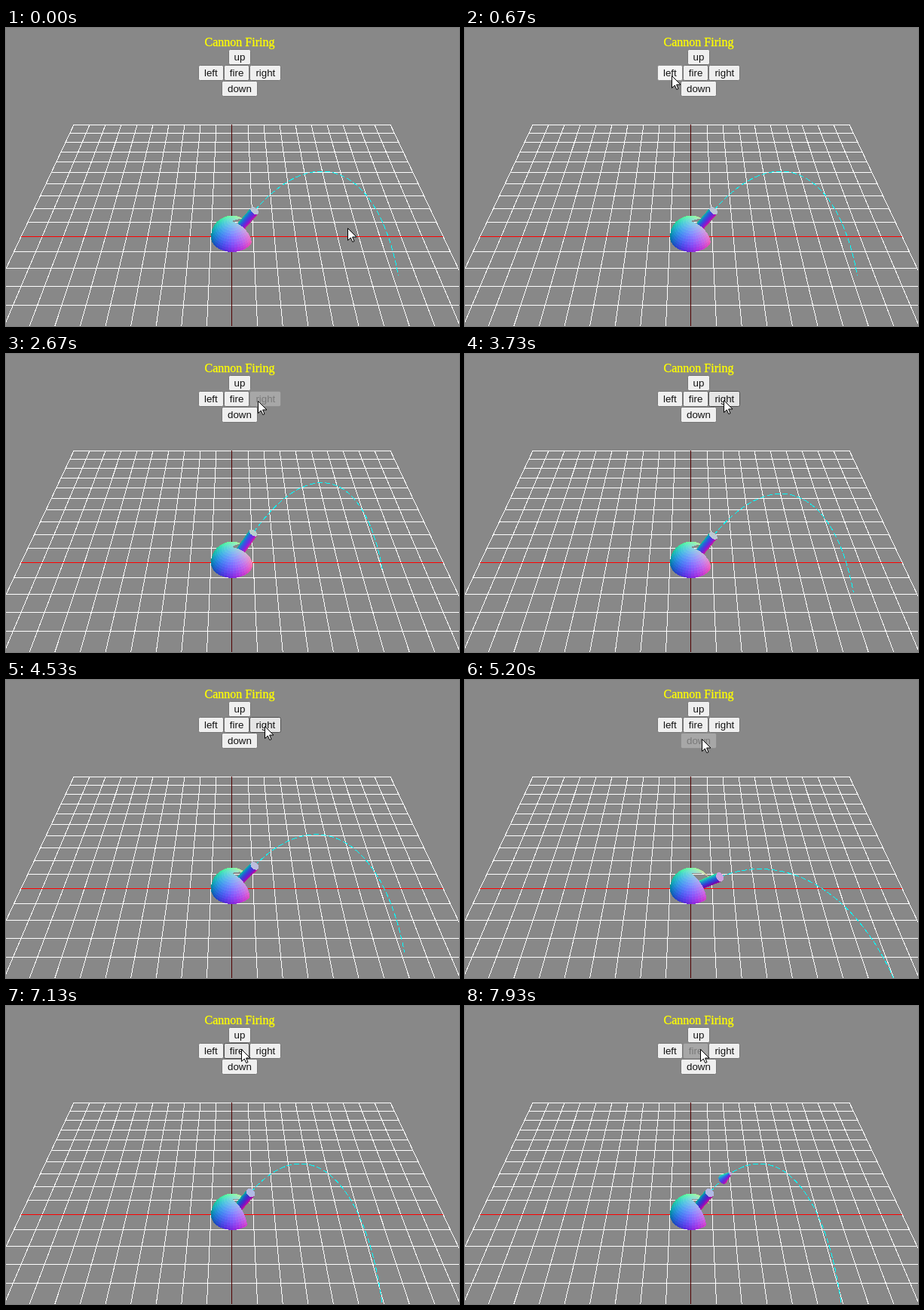
These frames come from a looping animation (601 px wide and 395 px high, 8 s). An HTML page:

```html
<!DOCTYPE html>
<html lang="en">
<head>
<meta charset="utf-8">
<title>Cannon Firing</title>
<style>
  html, body { margin: 0; width: 100%; height: 100%; overflow: hidden; background: #888; }
  svg { display: block; width: 601px; height: 395px; }
  .crisp { shape-rendering: crispEdges; }
  .title { font: 16px "Liberation Serif", "Times New Roman", serif; fill: #ff0; stroke: #ff0; stroke-width: .3; text-anchor: middle; }
  .btn text { font: 13.333px "Liberation Sans", Arial, sans-serif; fill: #111; text-anchor: middle; }
  .btn rect { fill: #efefef; stroke: #767676; }
  .btn.hover rect { fill: #e5e5e5; stroke: #4f4f4f; }
  .btn.active rect { fill: #f5f5f5; stroke: #8d8d8d; }
  .btn.off rect { fill: rgba(239,239,239,.3); stroke: rgba(118,118,118,.3); }
  .btn.off text { fill: rgba(16,16,16,.3); }
</style>
</head>
<body>
<svg viewBox="0 0 601 395">
  <rect width="601" height="395" fill="#888"/>
  <g class="crisp" fill="none">
    <path id="grid" stroke="#fff"/>
    <path id="axisX" stroke="#f00"/>
    <path id="axisZ" stroke="#500000"/>
    <path id="arc" stroke="#0ff" stroke-dasharray="7 3"/>
  </g>
  <g id="cannon" class="crisp"></g>
  <g id="shell" class="crisp"></g>
  <text class="title" x="310" y="24">Cannon Firing</text>
  <g id="buttons"></g>
  <path id="cursor" d="M-.5 .5V16.5L3.3 13L5.8 18.5L8 17.5L5.6 12H11Z" fill="#fff" stroke="#000"/>
</svg>
<script>
const LOOP = 8000, RAD = Math.PI / 180;
const SPEED = 8, GRAVITY = 9.8, LENGTH = 2.1;
const CAM = [0, 15, 15];
const $ = id => document.getElementById(id);

// ---- vectors and projection: camera looks at the origin from 45 degrees
const add = (a, b, k = 1) => a.map((v, i) => v + b[i] * k);
const dot = (a, b) => a[0] * b[0] + a[1] * b[1] + a[2] * b[2];
const cross = (a, b) => [a[1] * b[2] - a[2] * b[1], a[2] * b[0] - a[0] * b[2], a[0] * b[1] - a[1] * b[0]];
const unit = a => a.map(v => v / Math.hypot(...a));

function project([x, y, z]) {
  const depth = 30 - y - z;
  return (300.02 + 840 * x / depth).toFixed(2) + ' ' + (276.5 - 593 * (y - z) / depth).toFixed(2);
}
const line = pts => 'M' + pts.map(project).join('L');

function normalColour([x, y, z]) {
  const view = [x, (y - z) * Math.SQRT1_2, (y + z) * Math.SQRT1_2];
  return 'rgb(' + view.map(v => Math.round(127.5 + 127.5 * v)) + ')';
}
function face(pts, normal) {
  if (dot(normal, add(CAM, pts[0], -1)) <= 0) return '';
  return `<path d="${line(pts)}Z" fill="${normalColour(normal)}"/>`;
}

// ---- solids
const onSphere = (th, ph) =>
  [Math.sin(th) * Math.cos(ph), Math.cos(th), Math.sin(th) * Math.sin(ph)];

function domePart(from, to, cols) {
  const rows = 12, dt = Math.PI / 2 / rows, dp = (to - from) * RAD / cols;
  let out = '';
  for (let i = 0; i < cols; i++) {
    const p = from * RAD + i * dp;
    for (let j = 0; j < rows; j++) {
      const t = j * dt;
      out += face([onSphere(t, p), onSphere(t + dt, p), onSphere(t + dt, p + dp), onSphere(t, p + dp)],
        onSphere(t + dt / 2, p + dp / 2));
    }
  }
  return out;
}

function tube(a, b, ra, rb) {
  const n = 24, d = unit(add(b, a, -1));
  const u = unit([-d[2], 0, d[0]]), v = cross(u, d);
  const radial = k => {
    const w = k * 2 * Math.PI / n;
    return add(u.map(c => c * Math.cos(w)), v, Math.sin(w));
  };
  const ring = (c, r) => Array.from({ length: n }, (_, k) => add(c, radial(k), r));
  const A = ring(a, ra), B = ring(b, rb);
  const lean = (ra - rb) / Math.hypot(...add(b, a, -1));
  let out = face(A, d.map(c => -c));
  for (let k = 0; k < n; k++) {
    const m = (k + 1) % n;
    out += face([A[k], A[m], B[m], B[k]], unit(add(radial(k + .5), d, lean)));
  }
  return out + face(B, d);
}

// ---- ballistics
function aim(az, el) {
  const a = az * RAD, e = el * RAD;
  return [Math.cos(e) * Math.cos(a), Math.sin(e), Math.cos(e) * Math.sin(a)];
}
function flight(d, t) {
  const p = d.map(c => c * (LENGTH + SPEED * t));
  p[1] -= GRAVITY * t * t / 2;
  return p;
}

// ---- script: button, click time, time enabled again, then azimuth, elevation, flight time
const steps = [
  ['', 0, 0, 10.5, 60.8, 1.77],
  ['left', 730, 1070, 3, 62.1, 1.76],
  ['left', 1200, 1470, -5, 63.4, 1.76],
  ['left', 1730, 2130, -13, 64.7, 1.76],
  ['right', 2670, 2930, -2, 62.9, 1.76],
  ['right', 3400, 3730, 7.7, 61.4, 1.76],
  ['right', 4070, 4330, 20, 59.4, 1.76],
  ['right', 4600, 4800, 30, 57.8, 1.76],
  ['down', 5200, 5470, 30.6, 45, 1.6],
  ['down', 5670, 5870, 30.6, 38, 1.6],
  ['up', 6330, 6530, 30, 46, 1.6],
  ['up', 6730, 6870, 31.5, 62.8, 1.9],
  ['fire', 7270, 8000, 31.5, 62.8, 1.9]
];
const HOLD = 67, LAUNCH = 7300, SLOWDOWN = 3150;

// time, x, y of the pointer
const moves = [
  [0, 454, 265], [70, 447, 257], [470, 275, 63], [2200, 275, 63], [2470, 335, 62],
  [2730, 335, 62], [2870, 339, 62], [3070, 339, 62], [3130, 344, 61], [4800, 344, 61],
  [4930, 315, 78], [5870, 315, 78], [6000, 315, 39], [6870, 315, 39], [7130, 313, 57], [8000, 313, 57]
];

// name, left, top, width
const buttons = [
  ['up', 294.6, 28, 30.8], ['left', 255, 49, 33.8], ['fire', 288.8, 49, 34.6],
  ['right', 323.4, 49, 41.9], ['down', 286, 70, 47.9]
];

function pointer(t) {
  const i = Math.max(1, moves.findIndex(m => m[0] > t));
  const [t0, x0, y0] = moves[i - 1], [t1, x1, y1] = moves[i];
  const k = (t - t0) / (t1 - t0);
  return [Math.round(x0 + (x1 - x0) * k), Math.round(y0 + (y1 - y0) * k)];
}

function buildStatic() {
  let d = '';
  for (let i = -10; i <= 10; i++) {
    if (!i) continue;
    d += line([[-10, 0, i], [10, 0, i]]) + line([[i, 0, -10], [i, 0, 10]]);
  }
  $('grid').setAttribute('d', d);
  $('axisX').setAttribute('d', line([[-10, 0, 0], [10, 0, 0]]));
  $('axisZ').setAttribute('d', 'M299.5 128V395');
  $('buttons').innerHTML = buttons.map(([name, x, y, w]) => {
    const l = Math.round(x), r = Math.round(x + w);
    return `<g class="btn" id="${name}"><rect x="${l + .5}" y="${y + .5}" width="${r - l - 1}" height="20" rx="2"/>` +
      `<text x="${x + w / 2}" y="${y + 15}">${name}</text></g>`;
  }).join('');
}

function drawCannon([, , , az, el, time]) {
  const d = aim(az, el), n = 60;
  const pts = Array.from({ length: n + 1 }, (_, i) => flight(d, time * i / n));
  $('arc').setAttribute('d', line(pts));
  const barrel = tube(d.map(c => c * .5), d.map(c => c * (LENGTH - .03)), .21, .21);
  $('cannon').innerHTML = domePart(az - 195, az - 45, 18) + barrel + domePart(az + 15, az + 165, 18);
}

function drawShell(t, d) {
  if (t < LAUNCH) return '';
  const s = (t - LAUNCH) / SLOWDOWN, p = flight(d, s);
  const dir = unit(add(d.map(c => c * SPEED), [0, -GRAVITY * s, 0]));
  return tube(add(p, dir, -.26), add(p, dir, .3), .21, .07);
}

function drawButtons(t, [cx, cy]) {
  for (const [name, x, y, w] of buttons) {
    let state = cx >= x && cx < x + w && cy >= y && cy < y + 21 ? 'hover' : '';
    for (const [b, click, ready] of steps) {
      if (b !== name) continue;
      if (t >= click && t < ready) state = 'off';
      else if (t >= click - HOLD && t < click) state = 'active';
    }
    $(name).setAttribute('class', 'btn ' + state);
  }
}

let shown = null;
function render(t) {
  const step = steps.filter(s => s[1] <= t).pop();
  if (step !== shown) drawCannon(shown = step);
  $('shell').innerHTML = drawShell(t, aim(step[3], step[4]));
  const pos = pointer(t);
  $('cursor').setAttribute('transform', `translate(${pos})`);
  drawButtons(t, pos);
}

buildStatic();
const start = performance.now();
function tick() {
  render((performance.now() - start) % LOOP);
  requestAnimationFrame(tick);
}
tick();
</script>
</body>
</html>
```
